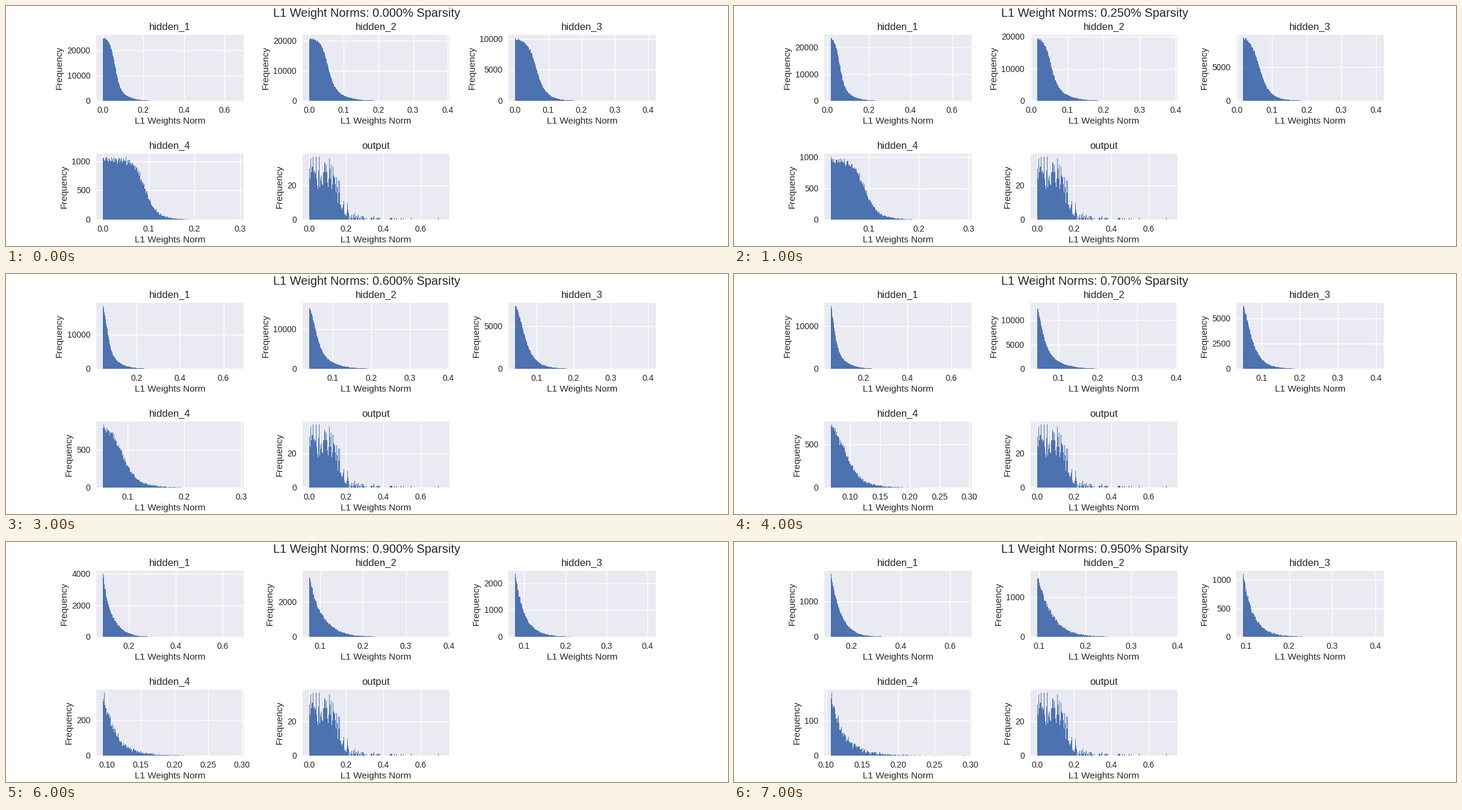
Animation, 1200 px wide and 400 px high, one loop 8 s. Source, as a matplotlib script:

```python
import numpy as np
import matplotlib.pyplot as plt
from matplotlib.animation import FuncAnimation
from matplotlib.transforms import ScaledTranslation

BLUE, PANEL, INK = "#4C72B0", "#EAEAF2", "#262626"
BINS = 300
OUTPUT_PEAK = 37
SPARSITY = [0, 0.25, 0.5, 0.6, 0.7, 0.8, 0.9, 0.95]

plt.rcParams.update({
    "font.family": "Liberation Sans", "text.color": INK,
    "axes.facecolor": PANEL, "axes.labelcolor": INK,
    "axes.labelsize": 11, "axes.titlesize": 12,
    "axes.grid": True, "axes.axisbelow": True,
    "grid.color": "white", "grid.linewidth": 1, "grid.linestyle": "-",
    "xtick.labelsize": 10, "ytick.labelsize": 10,
    "xtick.color": INK, "ytick.color": INK,
    "xtick.major.size": 0, "ytick.major.size": 0,
    "xtick.major.pad": 6.3, "ytick.major.pad": 7,
})
for side in ("left", "right", "top", "bottom"):
    plt.rcParams[f"axes.spines.{side}"] = False

# Weight count, largest norm, then (centre, width) of the body and of the
# tail, and the share of the tail
LAYERS = {
    "hidden_1": (784_000, .661, (.0595, .0125), (.1, .034), .2),
    "hidden_2": (1_000_000, .3863, (.054, .0095), (.08, .026), .26),
    "hidden_3": (500_000, .4035, (.062, .0125), (.09, .0235), .18),
    "hidden_4": (100_000, .2924, (.0902, .011), (.109, .0205), .18),
    "output": (2_000, .7213, (.16, .02), (.2, .1), .08),
}

rng = np.random.default_rng(7)


def falloff(x, centre, width):
    return 1 / (1 + np.exp((x - centre) / width))


def sample(count, top, body, tail, share):
    """Sorted random weights: a flat body that drops off into a long tail."""
    x = np.linspace(0, top, 6001)
    density = (1 - share) * falloff(x, *body) + share * falloff(x, *tail)
    cdf = np.append(0, np.cumsum((density[1:] + density[:-1]) / 2))
    weights = np.interp(np.sort(rng.random(count)), cdf / cdf[-1], x)
    weights[-1] = top
    return weights


def prune_steps(name):
    """One histogram per sparsity; the smallest weights go first."""
    weights = sample(*LAYERS[name])
    if name == "output":
        counts, edges = np.histogram(weights, BINS)
        return [(np.minimum(counts, OUTPUT_PEAK), edges)] * len(SPARSITY)
    return [np.histogram(weights[int(s * len(weights)):], BINS)
            for s in SPARSITY]


hists = {name: prune_steps(name) for name in LAYERS}

fig, grid = plt.subplots(2, 3, figsize=(12, 4), dpi=100, facecolor="white")
fig.subplots_adjust(left=.125, right=.9, bottom=.11, top=.88, wspace=.4, hspace=.8)
axes = grid.ravel()
axes[-1].set_axis_off()
heading = fig.text(.5, .9925, "", size=14.4, ha="center", va="top")
half_pixel_up = ScaledTranslation(0, .005, fig.dpi_scale_trans)


def draw(frame):
    heading.set_text(f"L1 Weight Norms: {SPARSITY[frame]:.3f}% Sparsity")
    for ax, (name, steps) in zip(axes, hists.items()):
        counts, edges = steps[frame]
        ax.clear()
        ax.bar(edges[:-1], counts, np.diff(edges), align="edge",
               color=BLUE, linewidth=0)
        ax.set_title(name)
        ax.set_xlabel("L1 Weights Norm", labelpad=3.3)
        ax.set_ylabel("Frequency")
        for label in ax.get_yticklabels():
            label.set_transform(label.get_transform() + half_pixel_up)
    return []


anim = FuncAnimation(fig, draw, frames=len(SPARSITY), interval=1000,
                     init_func=lambda: draw(0), repeat=True, repeat_delay=0)
plt.show()
```
